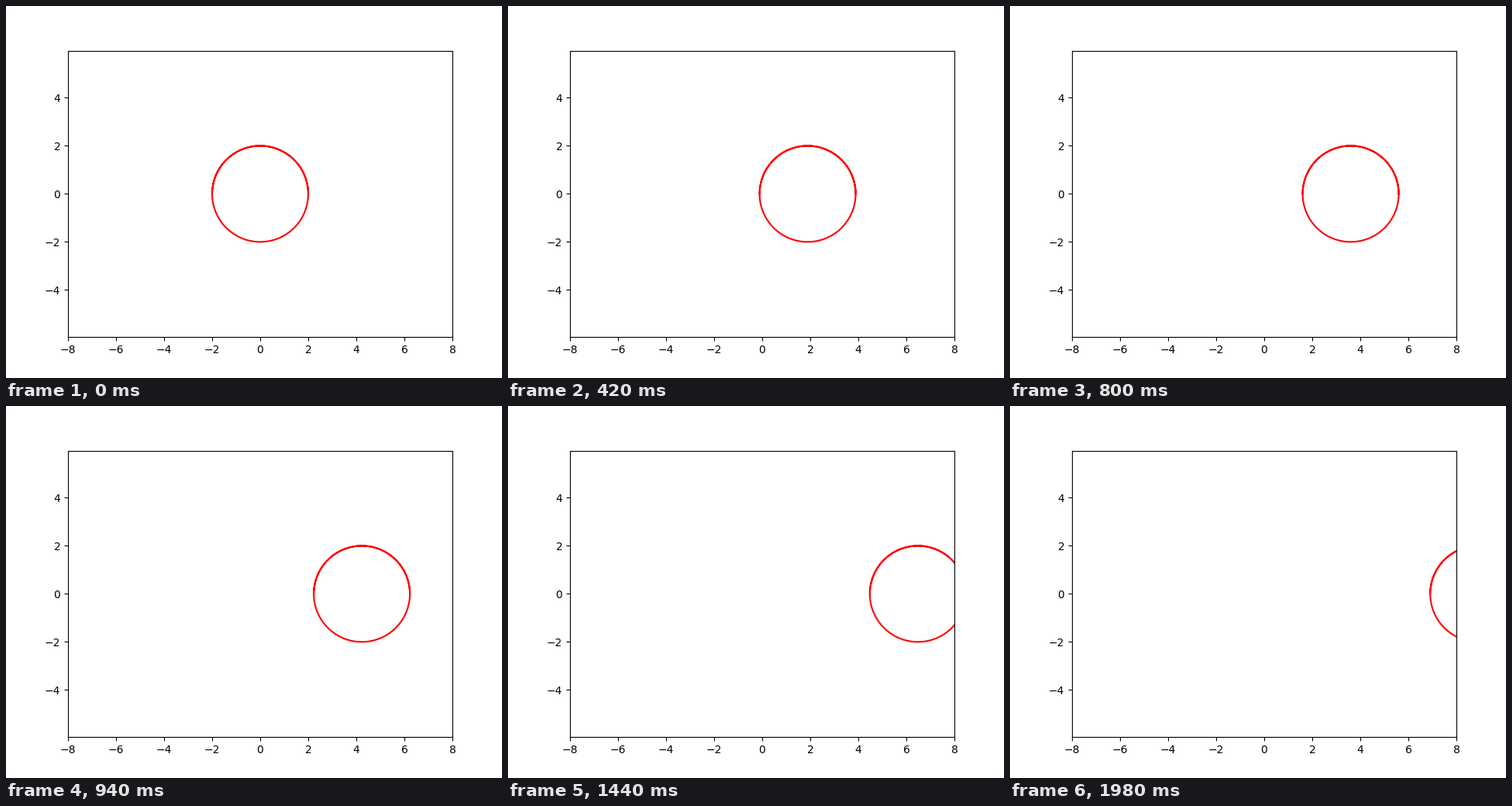
These frames come from a looping animation (640x480 px, 2000 ms). A matplotlib script:

```python
import numpy as np
import matplotlib.pyplot as plt
from matplotlib.animation import FuncAnimation

FRAMES = 100
INTERVAL = 20  # ms
RADIUS = 2
STEP = 0.09  # shift to the right per frame

# One and a half turns: the upper half is traced twice.
theta = np.linspace(0, 3 * np.pi, 300)
x, y = RADIUS * np.cos(theta), RADIUS * np.sin(theta)

fig, ax = plt.subplots(figsize=(6.4, 4.8), dpi=100)
ax.set_xlim(-8, 8)
ax.set_ylim(-6, 6)
ax.set_aspect("equal", adjustable="datalim")
half = 8 * (4.8 * 0.77) / (6.4 * 0.775)
ax.set_ylim(-half, half)
line, = ax.plot(x, y, color="red", lw=1.5, scalex=False, scaley=False)


def update(i):
    line.set_data(x + STEP * i, y)
    return line,


anim = FuncAnimation(fig, update, frames=FRAMES, interval=INTERVAL,
                     repeat=True, repeat_delay=0)
plt.show()
```
